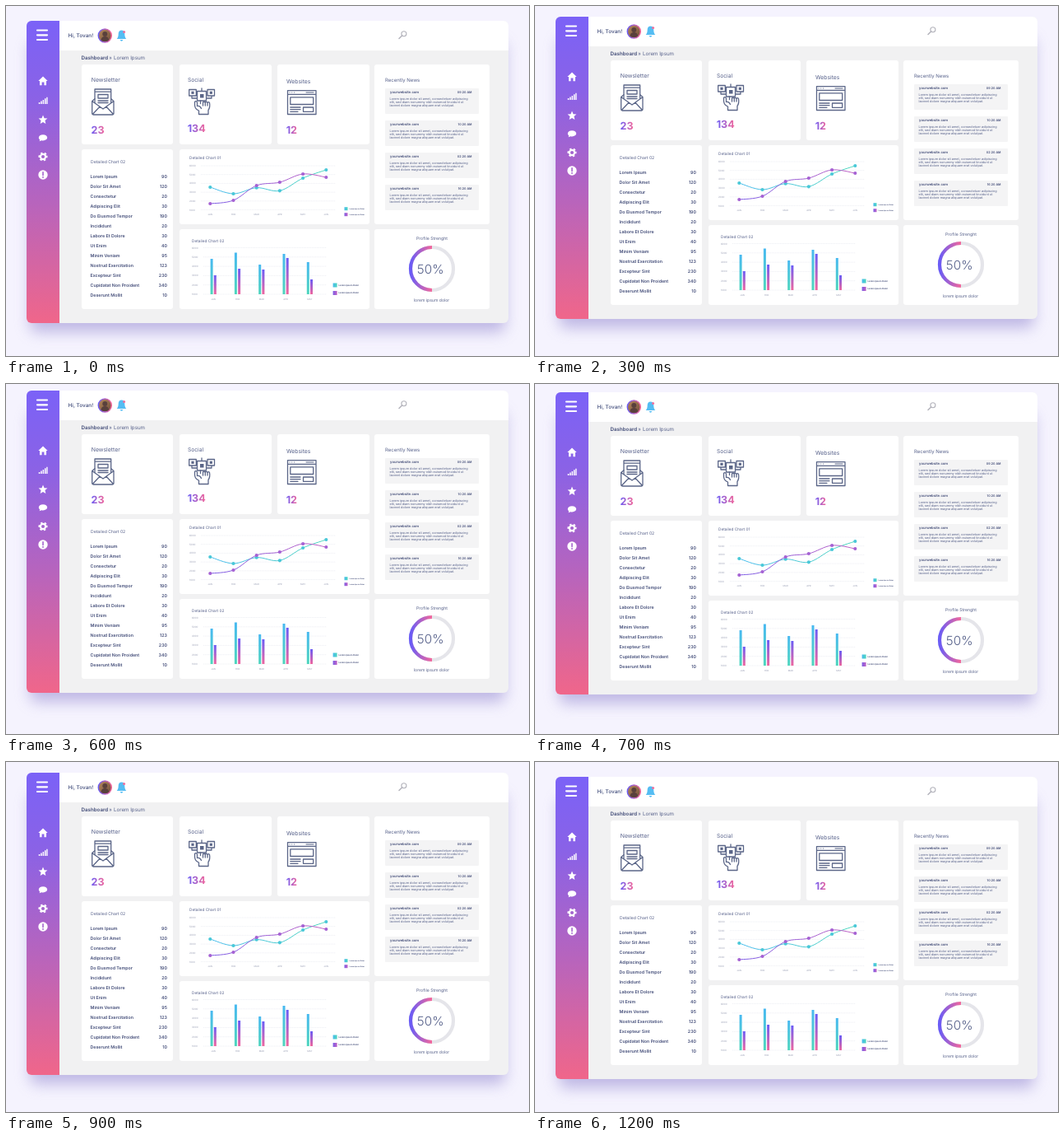
Recreate the animation shown at these times as an HTML page. Size 636 by 425 pixels, loop 1300 ms.

```html
<!DOCTYPE html>
<html lang="en">
<head>
<meta charset="utf-8">
<title>Dashboard</title>
<style>
  @property --y { syntax: "<integer>"; inherits: false; initial-value: 0; }
  html, body { margin: 0; width: 100%; height: 100%; overflow: hidden; background: #f5f3fe; }
  svg { display: block; width: 636px; height: 425px; font-family: Inter, "Open Sans", sans-serif; text-rendering: geometricPrecision; }
  #window { transform: translateY(calc(var(--y) * 1px)); animation: float 1300ms infinite; }
  /* up for 600 ms, down for 600 ms, then one beat of rest */
  @keyframes float {
    0% { --y: 0; animation-timing-function: steps(6); }
    46.15% { --y: -10; animation-timing-function: steps(6); }
    92.3%, 100% { --y: 0; }
  }
  .shadow { fill: #a9a0da; opacity: .72; filter: blur(9px); }
  .card { fill: #fff; }
  .line { fill: none; stroke: #5b6688; stroke-width: 1.3; stroke-linejoin: round; stroke-linecap: round; }
  .white { fill: #fff; }
  .grid { stroke: #dfe1ea; stroke-width: .5; stroke-dasharray: 1.2 .8; }
  text { fill: #56608a; }
  .dark { fill: #424c78; }
  .pale { fill: #9a9fb5; }
  .bold { font-weight: 700; }
  .semi { font-weight: 600; }
  .light { font-weight: 300; }
  .mid { text-anchor: middle; }
  .end { text-anchor: end; }
</style>
</head>
<body>
<svg viewBox="0 0 636 425">
  <defs>
    <linearGradient id="side" x2="0" y2="1"><stop stop-color="#7b62f7"/><stop offset=".25" stop-color="#8a62e6"/><stop offset=".6" stop-color="#b764bd"/><stop offset="1" stop-color="#f0668a"/></linearGradient>
    <linearGradient id="hot"><stop stop-color="#6a5cf6"/><stop offset="1" stop-color="#f4679a"/></linearGradient>
    <linearGradient id="hotBar" x2="0" y2="1"><stop stop-color="#6a5cf6"/><stop offset="1" stop-color="#ee679f"/></linearGradient>
    <linearGradient id="coolBar" x2="0" y2="1"><stop stop-color="#48b9f1"/><stop offset="1" stop-color="#4ed6bd"/></linearGradient>
    <linearGradient id="cool"><stop stop-color="#48bcee"/><stop offset="1" stop-color="#4ed6bd"/></linearGradient>
    <linearGradient id="violet"><stop stop-color="#7d5ee6"/><stop offset="1" stop-color="#c062c4"/></linearGradient>
    <linearGradient id="photo" x2="1" y2="1"><stop stop-color="#b98a5a"/><stop offset="1" stop-color="#6d4b3d"/></linearGradient>
    <clipPath id="frame"><rect x="25" y="18" width="586" height="367" rx="6"/></clipPath>
  </defs>
  <g id="window">
    <rect class="shadow" x="29" y="44" width="578" height="352" rx="8"/>
    <g clip-path="url(#frame)">
      <rect x="25" y="18" width="586" height="367" fill="#f1f1f2"/>
      <rect class="white" x="65" y="18" width="546" height="36"/>
      <rect x="25" y="18" width="40" height="367" fill="url(#side)"/>
    </g>

    <path d="M38 29.5H50M38 35.3H50M38 41H50" stroke="#fff" stroke-width="2.2" stroke-linecap="round"/>
    <g class="white">
      <path d="M45 85.5 50.7 91H49V96.3H46.4V92.6H43.6V96.3H41V91H39.3Z"/>
      <path d="M39.8 117h1.5v2h-1.5zM42.2 115.6h1.5v3.4h-1.5zM44.6 114h1.5v5h-1.5zM47 112.3h1.5v6.7h-1.5zM49.2 110.8h1.4v8.2h-1.4z"/>
      <path id="star"/>
      <path d="M45 156.2c3 0 5.2 1.5 5.2 3.6s-2.2 3.6-5.2 3.6c-.6 0-1.2 0-1.8-.2l-2.6 1 .6-1.8c-.9-.7-1.4-1.6-1.4-2.6 0-2.1 2.2-3.6 5.2-3.6z"/>
      <circle cx="45" cy="205" r="5.7"/>
    </g>
    <circle cx="45" cy="183" r="3.1" fill="none" stroke="#fff" stroke-width="2.1"/>
    <circle cx="45" cy="183" r="4.8" fill="none" stroke="#fff" stroke-width="1.5" stroke-dasharray="2.5 2.527" transform="rotate(-15 45 183)"/>
    <path d="M45 201.7V205.6" stroke="#a463ce" stroke-width="1.6" stroke-linecap="round"/>
    <circle cx="45" cy="208" r=".9" fill="#a463ce"/>

    <circle cx="120.3" cy="36" r="8" fill="url(#photo)" stroke="url(#hot)" stroke-width="1.5"/>
    <path d="M115.5 41.4c.4-3.2 2.1-4.3 4.8-4.3s4.400 1.1 4.800 4.300c-2.800 2-6.800 2-9.600 0z" fill="#59403c"/>
    <circle cx="120.300" cy="34" r="3" fill="#59403c"/>
    <path d="M140.500 29.500c-2.700 0-3.800 2-3.800 4.500 0 3-.7 4.500-2 6.100h11.600c-1.300-1.600-2-3.100-2-6.100 0-2.500-1.100-4.500-3.800-4.500zM138.900 41h3.200c-.2 2.200-3 2.200-3.200 0z" fill="#55bdf3"/>
    <circle cx="143.600" cy="31.500" r="1.500" fill="#f0709c"/>
    <g fill="none" stroke="#b3b3bb" stroke-linecap="round">
      <circle cx="483.900" cy="33.700" r="3" stroke-width="1.100"/>
      <path d="M481.600 36 478 39.500" stroke-width="1.500"/>
    </g>

    <g id="cards"></g>

    <g class="line">
      <path d="M104.700 115.500V130.500Q104.700 132 106.200 132H129.500Q131 132 131 130.500V115.500L118 125ZM105.500 131.300 114 122.300M130.300 131.300 122 122.300M104.700 115.500 108 112.800M131 115.500 127.700 112.800"/>
      <path d="M108 117.500V101H127.700V117.500M108 104.200H127.700M112 107.500H124V112H112ZM112 115H124M112 117.500H124"/>
    </g>
    <g class="line">
      <path d="M222.700 101.500H231.300V109H222.700ZM245 101.500H253.500V109H245ZM232.500 103.500H243.500V115H232.500ZM226 109V112H232M250 109V112H244M238 100V103"/>
      <path d="M229.500 120.500V116.500Q231 114.500 232.500 117V121.500M229.500 120.500Q230 125.500 234.500 127V131.500H246V126.500Q248.500 123 247.500 117.500Q246.300 115.800 245 117.500Q243.800 115.300 242.300 117Q240.800 115.500 239.500 117V121M242.300 117V121M245 117.500V121M232.500 121.500Q236 120.500 237.500 124.500M236.500 115V118.500"/>
    </g>
    <g fill="#5b6688">
      <rect x="236" y="107" width="4.500" height="4.500"/>
      <rect x="225.400" y="103.700" width="3.200" height="3.200"/>
      <rect x="247.700" y="103.700" width="3.200" height="3.200"/>
    </g>
    <g class="line">
      <path d="M342.500 102.700H377V131.500H342.500ZM342.500 107.300H377M345.800 110.800H373.700V119.500H345.800ZM345.800 123H358M345.800 125.700H358M345.800 128.300H355M361.500 123H373.700V128.300H361.500Z"/>
      <path d="M345 105H345.100M347.700 105H347.800M350.400 105H350.500M365 105H374" stroke-width="1"/>
    </g>

    <g id="content"></g>

    <circle cx="518" cy="319" r="26" fill="none" stroke="#e5e5ea" stroke-width="4.200"/>
    <path d="M518 293A26 26 0 0 0 518 345" fill="none" stroke="url(#hot)" stroke-width="4.200"/>
  </g>
</svg>
<script>
  const NS = "http://www.w3.org/2000/svg";
  const content = document.getElementById("content");

  function add(tag, attrs, parent = content) {
    const el = document.createElementNS(NS, tag);
    for (const key in attrs) el.setAttribute(key, attrs[key]);
    return parent.appendChild(el);
  }
  function label(x, y, size, text, cls = "", extra = {}) {
    add("text", { x, y, "font-size": size, class: cls, ...extra }).textContent = text;
  }
  function box(x, y, width, height, fill, rx = 0) {
    add("rect", { x, y, width, height, fill, rx });
  }

  const starPoints = Array.from({ length: 10 }, (_, i) => {
    const r = i % 2 ? 2.6 : 5.7, a = (i * 36 - 90) * Math.PI / 180;
    return `${45 + r * Math.cos(a)} ${138.3 + r * Math.sin(a)}`;
  });
  document.getElementById("star").setAttribute("d", `M${starPoints.join("L")}Z`);

  const cards = document.getElementById("cards");
  for (const [x, y, width, height] of [
    [92, 71, 111, 97], [211, 71, 112, 97], [330, 71, 112, 97], [448, 71, 140, 194],
    [92, 174, 111, 194], [211, 174, 231, 91], [211, 271, 231, 97], [448, 271, 140, 97]
  ]) add("rect", { x, y, width, height, rx: 3, class: "card" }, cards);

  // Header and summary cards
  label(75.5, 38.3, 6.4, "Hi, Tovan!", "semi");
  label(91.5, 65.2, 6.2, "Dashboard", "semi dark");
  label(125.3, 65.2, 6.2, "»");
  label(131, 65.2, 6.2, "Lorem Ipsum");
  label(103.7, 92.3, 6.9, "Newsletter");
  label(221, 92.3, 6.7, "Social");
  label(341, 93.6, 6.8, "Websites");
  label(461, 92.3, 6, "Recently News");
  const hot = { style: "fill:url(#hot)" };
  label(103.5, 154.6, 12.6, "23", "bold", hot);
  label(220.7, 153.2, 12.6, "134", "bold", hot);
  label(340.7, 154.6, 12.6, "12", "bold", hot);

  // Table
  label(103, 191, 5.1, "Detailed Chart 02");
  Object.entries({
    "Lorem Ipsum": 90, "Dolor Sit Amet": 120, "Consectetur": 20, "Adipiscing Elit": 30,
    "Do Eiusmod Tempor": 190, "Incididunt": 20, "Labore Et Dolore": 30, "Ut Enim": 40,
    "Minim Veniam": 95, "Nostrud Exercitation": 123, "Excepteur Sint": 230,
    "Cupidatat Non Proident": 340, "Deserunt Mollit": 10
  }).forEach(([name, value], i) => {
    const y = 209.3 + i * 11.95;
    label(102.5, y, 5.3, name, "semi dark");
    label(196, y, 5.3, value, "semi dark end");
  });

  // News
  ["09:20 AM", "10:20 AM", "02:20 AM", "16:20 AM"].forEach((time, i) => {
    const y = 100 + i * 39;
    box(461, y, 114, 31, "#f4f4f5", 1);
    label(467, y + 5.8, 4.2, "yourwebsite.com", "semi dark");
    label(566.5, y + 5.8, 3.7, time, "semi dark end");
    ["Lorem ipsum dolor sit amet, consectetuer adipiscing",
     "elit, sed diam nonummy nibh euismod tincidunt ut",
     "laoreet dolore magna aliquam erat volutpat."
    ].forEach((text, n) => label(466.5, y + 13.8 + n * 4.3, 3.85, text));
  });

  function axes(x, top, step, width) {
    for (let i = 0; i < 6; i++) {
      const y = top + i * step;
      add("path", { d: `M${x + 14} ${y}H${x + 14 + width}`, class: "grid" });
      label(x, y + 1, 3, `${6 - i}000`, "pale");
    }
  }
  const months = ["JAN", "FEB", "MAR", "APR", "MAY", "JUN"];

  // Line chart
  label(223, 185.6, 4.75, "Detailed Chart 01");
  axes(223, 194, 10.7, 164);
  months.forEach((m, i) => label(248.3 + i * 28.2, 254.2, 2.8, m, "pale mid"));

  function curve(ys, stroke, dot) {
    const pts = ys.map((y, i) => [248.3 + i * 28.2, y]);
    const at = i => pts[Math.max(0, Math.min(pts.length - 1, i))];
    const slope = (i, k) => (at(i + 1)[k] - at(i - 1)[k]) / 6;
    let d = `M${pts[0]}`;
    for (let i = 0; i < pts.length - 1; i++) {
      const a = [0, 1].map(k => at(i)[k] + slope(i, k));
      const b = [0, 1].map(k => at(i + 1)[k] - slope(i + 1, k));
      d += `C${a} ${b} ${at(i + 1)}`;
    }
    add("path", { d, fill: "none", stroke, "stroke-width": 1 });
    for (const [cx, cy] of pts) add("circle", { cx, cy, r: 2.1, fill: dot });
  }
  curve([220, 228, 220.7, 224.3, 209, 199], "url(#cool)", "#49c8d8");
  curve([240, 236, 218, 214, 204, 208], "url(#violet)", "#a561d3");

  function legend(x, y, size, gap, font) {
    ["url(#cool)", "url(#violet)"].forEach((fill, i) => {
      const top = y + i * gap;
      box(x, top, size, size, fill);
      label(x + size + 2, top + size / 2 + font * .36, font, "Lorem Ipsum Dolor", "semi dark");
    });
  }
  legend(411.5, 244.2, 4, 7, 2.05);

  // Bar chart
  label(226, 287.3, 4.75, "Detailed Chart 02");
  axes(226, 293.5, 11.3, 150);
  const cool = [307, 299.5, 314, 301, 311], warm = [327, 319, 320, 306, 332];
  cool.forEach((top, i) => {
    const x = 248.6 + i * 29.3;
    box(x, top, 3, 350 - top, "url(#coolBar)");
    box(x + 4.2, warm[i], 3, 350 - warm[i], "url(#hotBar)");
    label(x + 3.6, 356.6, 2.8, months[i], "pale mid");
  });
  legend(397.6, 336.5, 5, 9.5, 2.7);

  // Gauge
  label(518, 284.4, 5.2, "Profile Strenght", "mid");
  label(516.2, 324.5, 15.3, "50%", "light mid");
  label(517.5, 358.8, 5.1, "lorem ipsum dolor", "mid");
</script>
</body>
</html>
```
